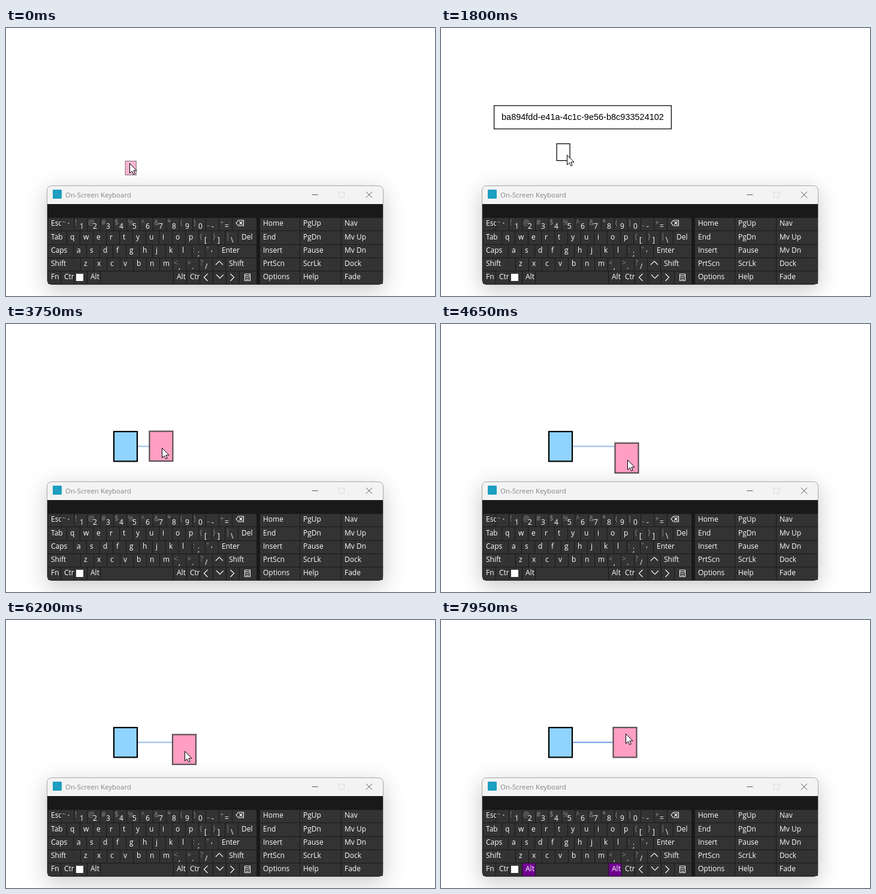
Write an HTML page that moves like this. It is 716 px wide and 446 px high and loops after 8000 ms.

```html
<!DOCTYPE html>
<html lang="en">
<head>
<meta charset="utf-8">
<title>Dragging above an on-screen keyboard</title>
<style>
  html, body { margin: 0; width: 100%; height: 100%; overflow: hidden; background: #fff; }
  svg { display: block; }
  .keyboard { font: 12px "Open Sans", "Noto Sans", sans-serif; fill: #fff; }
  .window { filter: drop-shadow(0 9px 18px rgba(0, 0, 0, .21)); }
  .title { font-size: 11.5px; fill: #858585; }
  .key { fill: #333; }
  .pressed .alt { fill: #700090; }
  .shift { fill: #858585; }
  .icon { fill: none; stroke: #fff; stroke-width: 1.1; }
  .button { fill: none; stroke: #555; }
  .box { fill: #fff; stroke: #000; stroke-width: 1.25; }
  .label { font: 14.5px "Liberation Sans", Arial, sans-serif; }
</style>
</head>
<body>
<svg width="716" height="446" viewBox="0 0 716 446">
  <g id="idle">
    <rect class="box" x="88.6" y="129.2" width="295.8" height="38.7"/>
    <text class="label" x="101" y="153">ba894fdd-e41a-4c1c-9e56-b8c933524102</text>
    <rect class="box" x="193.1" y="192.6" width="22" height="28"/>
  </g>
  <g id="anchor">
    <rect x="180" y="179" width="39" height="49.5" fill="#8fd3ff" stroke="#000" stroke-width="2.2"/>
    <line id="link" x1="220" y1="203.6" y2="203.6" stroke-width="2.2"/>
  </g>
  <rect id="ghost"/>
  <g class="keyboard" id="keyboard">
    <rect class="window" x="68.5" y="262.5" width="561" height="164.5" rx="7.5" fill="#f3f3f3" stroke="#a8a8a8"/>
    <path d="M69 293H629V420a7 7 0 0 1-7 7H76a7 7 0 0 1-7-7Z" fill="#191919"/>
    <rect x="78" y="269" width="15" height="15" rx="1" fill="#1c9fc0"/>
    <text class="title" x="99" y="282">On-Screen Keyboard</text>
    <path class="button" d="M510.5 277.5h10M601 272.5l10 10m0-10l-10 10"/>
    <rect class="button" x="555.5" y="273" width="9" height="9" rx="1" style="stroke:#d8d8d8"/>
  </g>
  <path id="cursor" d="M.5 .5V16.5L4.3 13.2L6.7 18.5L9.2 17.4L6.9 12.2H12Z" fill="#fff" stroke="#000"/>
</svg>
<script>
const $ = id => document.getElementById(id);
const LOOP = 8000, STEP = 50;
const DROP = 450, GRAB = 3550, ALT_DOWN = 6950, LOCK = 7450;
const ROW_TOP = 316.2, ROW_PITCH = 22.2, KEY_WIDTH = 22, SPACE_WIDTH = 122;

function set(el, attrs) {
  for (const name in attrs) el.setAttribute(name, attrs[name]);
}

function add(tag, attrs, text = '') {
  const el = document.createElementNS('http://www.w3.org/2000/svg', tag);
  set(el, attrs);
  el.textContent = text;
  $('keyboard').append(el);
}

// Icon paths are relative to the top left corner of their key.
const icons = {
  bksp: 'M7 8.5l4-4.5h8.5v9H11zM12.5 6l5 5m0-5l-5 5',
  up: 'M6 11l6-6 6 6',
  down: 'M6 5.5l6 6 6-6',
  left: 'M13.5 4l-6 6 6 6',
  right: 'M7.500 4l6 6-6 6',
  menu: 'M9.5 4.5h9v11h-9zM9.5 7.5h9M11.5 10.500h5M11.5 13.5h5',
};

function key(x, row, width, name) {
  const edge = r => Math.round(ROW_TOP + ROW_PITCH * r);
  const y = edge(row);
  const baseline = Math.round(ROW_TOP + ROW_PITCH * row + 13.2);
  add('rect', {
    class: name === 'Alt' ? 'key alt' : 'key',
    x: x + 1, y, width: width - 1, height: edge(row + 1) - y - 1,
  });
  if (name === 'space') return;
  if (name === 'win') {
    add('rect', { x: x + 4, y: y + 4, width: 12, height: 12 });
  } else if (icons[name]) {
    add('path', { class: 'icon', d: icons[name], transform: `translate(${x} ${y})` });
  } else if (/^[\W_]{2}$|^\W\d$/.test(name)) {
    add('text', { class: 'shift', x: x + 2, y: baseline - 1 }, name[0]);
    add('text', { x: x + 10, y: baseline + 5 }, name[1]);
  } else {
    add('text', { x: x + 6, y: baseline }, name);
  }
}

// Each row: width of its first key, main keys, side keys.
const rows = [
  [22, 'Esc ~` !1 @2 #3 $4 %5 ^6 &7 *8 (9 )0 _- += bksp', 'Home PgUp Nav'],
  [32, 'Tab q w e r t y u i o p {[ }] |\\ Del', 'End PgDn Mv_Up'],
  [43, 'Caps a s d f g h j k l :; "\' Enter', 'Insert Pause Mv_Dn'],
  [55, 'Shift z x c v b n m <, >. ?/ up Shift', 'PrtScn ScrLk Dock'],
  [22, 'Fn Ctr win Alt space Alt Ctr left down right menu', 'Options Help Fade'],
];
const sideEdges = [423, 490, 559, 629];

rows.forEach(([first, main, side], row) => {
  let x = 69;
  main.split(' ').forEach((name, i, all) => {
    const width = i === all.length - 1 ? 418 - x
      : i === 0 ? first
      : name === 'space' ? SPACE_WIDTH : KEY_WIDTH;
    key(x, row, width, name);
    x += width;
  });
  side.split(' ').forEach((name, i) =>
    key(sideEdges[i], row, sideEdges[i + 1] - sideEdges[i], name.replace('_', ' ')));
});

// Progress from 0 to 1 between two times, eased at both ends.
function glide(t, from, to) {
  const p = Math.min(1, Math.max(0, (t - from) / (to - from)));
  return p * p * (3 - 2 * p);
}

// The first box is nudged up and dropped; then the pointer moves aside.
function pointerBeforeGrab(t) {
  const up = glide(t, 0, DROP), aside = glide(t, DROP, 850);
  return { x: 206 - 3 * up + 7 * aside, y: 225 - 25 * up + 11 * aside - 2 * glide(t, 1800, 2300) };
}

// The box is pulled right, circled around, brought to rest and finally lifted.
function draggedCentre(t) {
  const out = glide(t, 3490, 4010), settle = glide(t, 6150, 6800), lift = glide(t, LOCK - STEP, 7950);
  const radius = out ** 4 * (1 - settle);
  const angle = Math.PI / 2 - (t - 4650) * 0.0076;
  return {
    x: 209 + 101 * out + 18 * radius * Math.cos(angle) - 3 * lift,
    y: 206 - 8 * out + 25 * radius * Math.sin(angle) + 6 * settle - 18 * lift,
  };
}

// The wheel zooms by a tenth per notch.
function zoomAt(t) {
  const notch = t < 1700 ? -2 : t < 2650 ? Math.min(5, Math.floor((t - 1800) / 100)) : 6;
  return 1.1 ** notch;
}

function draw(t) {
  const linked = t >= GRAB, dragging = t < DROP || linked, locked = t >= LOCK;
  const grip = linked ? { x: 1, y: 2.7 } : { x: -2.2, y: -8 };
  const centre = linked ? draggedCentre(t) : pointerBeforeGrab(t);
  const pointer = { ...centre };
  if (linked) {
    pointer.x += grip.x;
    pointer.y += grip.y;
  } else {
    centre.x -= grip.x;
    centre.y -= grip.y;
  }
  if (locked) centre.y = 203.7;

  const zoom = zoomAt(t);
  const width = 22 * zoom, height = 28 * zoom;
  const left = centre.x - width / 2;

  $('idle').style.display = dragging ? 'none' : '';
  $('anchor').style.display = linked ? '' : 'none';
  $('ghost').style.display = dragging ? '' : 'none';
  set($('idle'), { transform: `translate(210 211) scale(${zoom}) translate(-210 -211)` });
  set($('ghost'), {
    x: left, y: centre.y - height / 2, width, height, 'stroke-width': 1.25 * zoom,
    fill: linked ? '#ff9fc2' : '#fbb6d2', stroke: linked ? '#5c5056' : '#807078',
  });
  set($('link'), { x2: Math.max(220, left), stroke: locked ? '#7aa2e8' : '#a3bff0' });
  set($('cursor'), { transform: `translate(${Math.round(pointer.x)} ${Math.round(pointer.y)})` });
  $('keyboard').classList.toggle('pressed', t >= ALT_DOWN);
}

function frame() {
  draw(Math.floor(performance.now() % LOOP / STEP) * STEP);
  requestAnimationFrame(frame);
}
frame();
</script>
</body>
</html>
```
